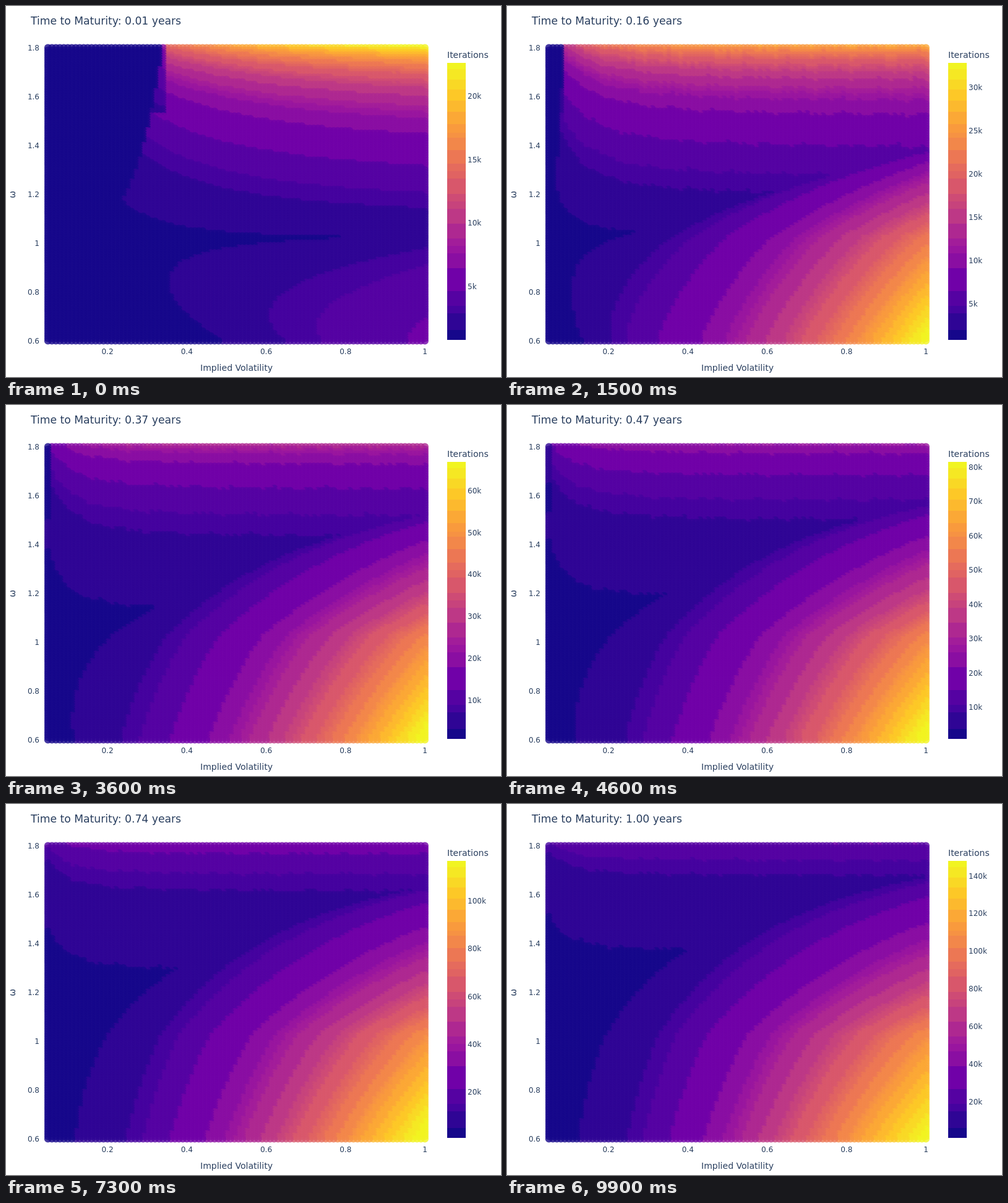
These frames come from a looping animation (800x600 px, 10 s). An HTML page with a canvas:

```html
<!DOCTYPE html>
<html lang="en">
<head>
<meta charset="utf-8">
<title>Iterations by volatility and relaxation</title>
<style>
html, body { margin: 0; width: 100%; height: 100%; overflow: hidden; background: #fff; }
canvas { display: block; }
</style>
</head>
<body>
<canvas id="stage" width="800" height="600"></canvas>
<script>
const ctx = document.getElementById('stage').getContext('2d');
const FONT = '"DejaVu Sans", Verdana, sans-serif';
const LOW = 0.8; // thousands of iterations at the foot of the scale

// Colour scale, cut into uneven bands
const STOPS = ['0d0887', '46039f', '7201a8', '9c179e', 'bd3786',
  'd8576b', 'ed7953', 'fb9f3a', 'fdca26', 'f0f921']
  .map(h => [0, 2, 4].map(i => parseInt(h.slice(i, i + 2), 16)));
const EDGES = [0, .036, .096, .123, .176, .259, .3125, .339, .366, .42, .473, .5, .527,
  .583, .609, .636, .685, .73, .748, .78, .824, .864, .904, .94, .978, 1];
const BANDS = EDGES.slice(1).map((e, i) => plasma((e + EDGES[i]) / 2));

function plasma(v) {
  const i = Math.min(8, Math.floor(v * 9)), f = v * 9 - i;
  return `rgb(${STOPS[i].map((c, k) => Math.round(c + (STOPS[i + 1][k] - c) * f))})`;
}

function bandOf(v) {
  let i = 0;
  while (i < BANDS.length - 1 && v >= EDGES[i + 1]) i++;
  return i;
}

// Largest value on the scale, in thousands
const PEAKS = [[0, 5], [.07, 17], [.27, 52.1], [.47, 81.5], [.62, 101.8], [.86, 131.7], [1, 147.9]];

function peak(T) {
  const i = Math.max(1, PEAKS.findIndex(p => p[0] >= T));
  const [t0, a] = PEAKS[i - 1], [t1, b] = PEAKS[i];
  return Math.max(a + (b - a) * (T - t0) / (t1 - t0), .4 + 4.48 * effort(T));
}

// Work per unit of convergence rate, by total variance
const effort = s => 5.8 / (1 + (.0011 / s) ** .8);

// Over-relaxation count: spectral radius of the sweep sets the rate
function iterations(sigma, w, T) {
  const s = sigma * sigma * T, a = 48 * s, mu = a / (1 + a);
  if (w > 1.12 && s < .0004 + .00075 * (Math.max(0, w - 1.127) / .673) ** .6) return LOW;
  let c = effort(s);
  const disc = w * w * mu * mu - 4 * (w - 1);
  let rho;
  if (disc < 0) {
    rho = w - 1;
    const rough = Math.min(1, T * 12);
    c *= 1 + rough * .012 * (Math.sin(sigma * 60 + w * 9 + T * 40)
      + Math.sin(sigma * 131 + T * 170) + Math.sin(sigma * 290 - w * 20 + T * 90));
    if (w > 1.52 && s < .0012) c *= .5;
  } else {
    rho = ((w * mu + Math.sqrt(disc)) / 2) ** 2;
    c *= Math.min(1, .6 + .95 * (w - .6)) * (1 - s * (.25 - .1 * (w - .6)));
    if (w < 1) c *= Math.max(0, 1 - (.0016 * Math.exp(-6 * (w - .6)) / s) ** 1.4);
  }
  return Math.max(LOW, .4 - c / Math.log(Math.max(rho, 1e-9)));
}

const px = sigma => 164 + (sigma - .2) * 641.25;
const py = w => 67.5 + (1.8 - w) * 395;

function label(str, x, y, size = 12, align = 'left') {
  ctx.font = `${size}px ${FONT}`;
  ctx.textAlign = align;
  ctx.fillText(str, x, y);
}

function drawField(T, top) {
  ctx.globalAlpha = .8;
  for (let j = 120; j >= 0; j--) {
    const w = .6 + j / 100;
    for (let i = 95; i >= 0; i--) {
      const sigma = .05 + i / 100;
      ctx.fillStyle = BANDS[bandOf((iterations(sigma, w, T) - LOW) / (top - LOW))];
      ctx.beginPath();
      ctx.arc(px(sigma), py(w), 6, 0, 7);
      ctx.fill();
    }
  }
  ctx.globalAlpha = 1;
}

function drawScale(top) {
  BANDS.forEach((c, i) => {
    const y0 = Math.round(540 - EDGES[i + 1] * 448), y1 = Math.round(540 - EDGES[i] * 448);
    ctx.fillStyle = c;
    ctx.fillRect(713, y0, 30, y1 - y0);
  });
  ctx.fillStyle = '#2a3f5f';
  label('Iterations', 713, 84, 14);
  const rough = (top - LOW) / 9;
  const step = [5, 10, 20].find(d => d >= rough);
  for (let v = step; v <= top; v += step)
    label(v + 'k', 746, 540 - (v - LOW) / (top - LOW) * 448 + 4.5);
}

function drawAxes(T) {
  label(`Time to Maturity: ${T.toFixed(2)} years`, 40, 30, 17.2);
  for (let k = 1; k <= 5; k++) label(String(k / 5), px(k / 5), 563, 12, 'center');
  for (let k = 3; k <= 9; k++) label(String(k / 5), 54, py(k / 5) + 4.5, 12, 'right');
  label('Implied Volatility', 372.5, 590, 14, 'center');
  ctx.save();
  ctx.translate(15, 305);
  ctx.rotate(-Math.PI / 2);
  label('ω', 0, 0, 14, 'center');
  ctx.restore();
}

let shown = -1;
const start = performance.now();

function tick() {
  const step = Math.floor((performance.now() - start) / 100) % 100;
  if (step !== shown) {
    shown = step;
    const T = (step + 1) / 100, top = peak(T);
    ctx.fillStyle = '#fff';
    ctx.fillRect(0, 0, 800, 600);
    drawField(T, top);
    drawScale(top);
    drawAxes(T);
  }
  requestAnimationFrame(tick);
}
tick();
</script>
</body>
</html>
```
